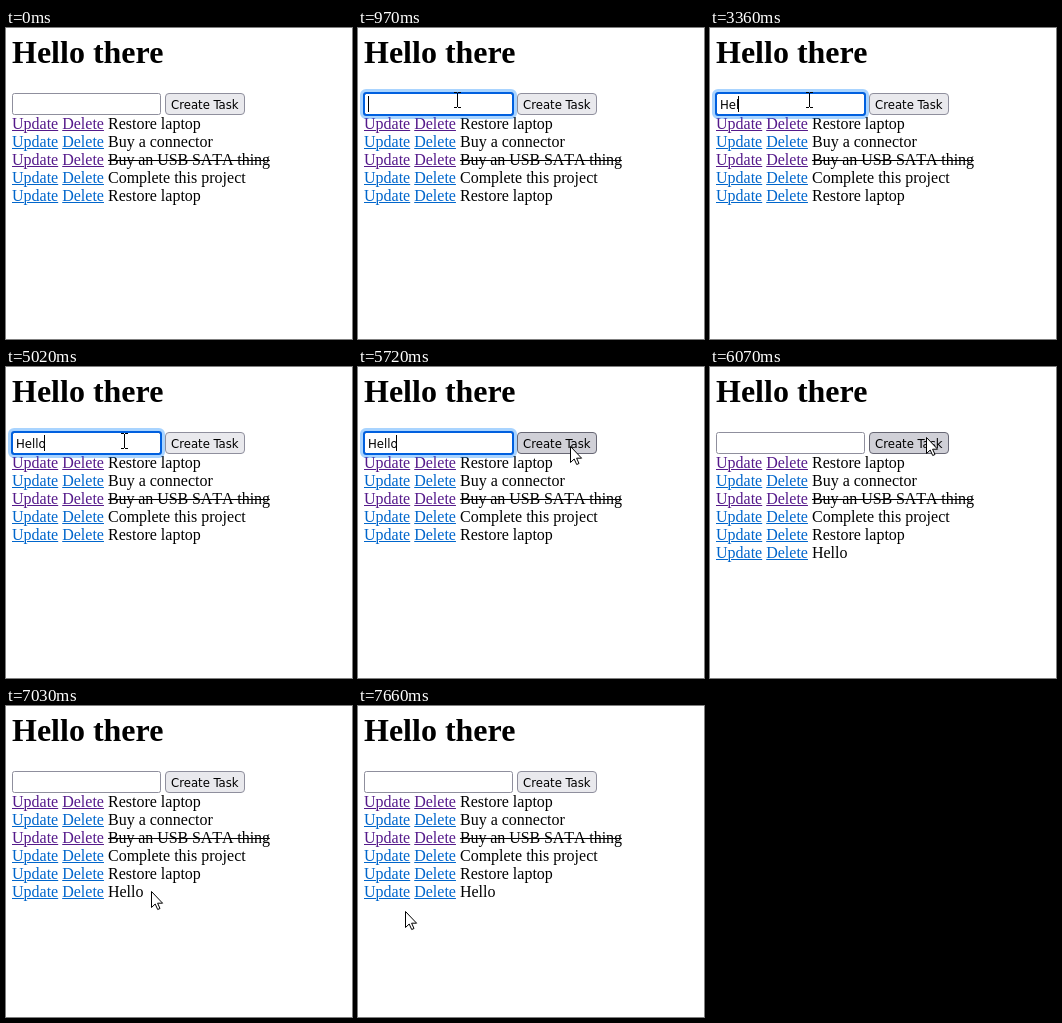
Recreate the animation shown at these times as an HTML page. Size 346 by 311 pixels, loop 8000 ms.

```html
<!DOCTYPE html>
<html lang="en">
<head>
<meta charset="utf-8">
<title>Task list</title>
<style>
  html, body { margin: 0; width: 100%; height: 100%; overflow: hidden; background: #fff; }
  body { position: relative; font: 16px/18px "Liberation Serif", serif; color: #000; }
  h1, #list { position: absolute; left: 6px; margin: 0; white-space: pre; }
  h1 { top: 6px; font-size: 32px; line-height: 36px; }
  #list { top: 87px; }
  #list div { height: 18px; }
  .link { color: #0066cc; text-decoration: underline 1px; text-underline-offset: 1px; }
  .visited { color: #551a8b; }
  .done { text-decoration: line-through 1px; font-kerning: none; letter-spacing: -.08px; }
  svg { position: absolute; left: 0; top: 0; width: 100%; height: 100%; }
  .control { font: 13px "DejaVu Sans Condensed", "DejaVu Sans", sans-serif; font-stretch: condensed; }
</style>
</head>
<body>
<h1>Hello there</h1>
<div id="list"></div>
<svg viewBox="0 0 346 311">
  <g class="control">
    <rect id="button" x="159.5" y="65.5" width="79" height="21" rx="3.5" stroke="#8f8f9d"/>
    <text x="165" y="81">Create Task</text>
    <rect id="field" x="6.5" y="65.5" width="148" height="21" rx="2" fill="#fff"/>
    <g id="focus" fill="none">
      <rect x="3.5" y="62.5" width="154" height="27" rx="4.5" stroke="#0a84ff" stroke-opacity=".35" stroke-width="3"/>
      <rect x="6" y="65" width="149" height="22" rx="2" stroke="#0060df" stroke-width="2"/>
    </g>
    <text id="typed" x="10" y="81"></text>
    <rect id="caret" y="68" width="1" height="16"/>
  </g>
  <path id="arrow" d="M.5 .5V16.5L4.2 13L6.7 18.5L9 17.5L6.6 12.2H11.6Z" fill="#fff" stroke="#000" stroke-linejoin="round"/>
  <path id="beam" d="M-3 -6.5H0M1 -6.5H4M.5 -6V8M-3 8.5H0M1 8.5H4" fill="none" stroke="#000"/>
</svg>
<script>
const LOOP = 8000, STEP = 70, BLINK = 530;
const FOCUS = 970, PRESS = 5790, RELEASE = 5870, RELOAD = 6070;
const WORD = "Hello";
const keyTimes = [2030, 3020, 3360, 3490, 3560];
const caretX = [10, 18, 25, 28, 31, 38];

const tasks = [
  { name: "Restore laptop", right: 195, visited: true },
  { name: "Buy a connector", right: 207 },
  { name: "Buy an USB SATA thing", right: 264, visited: true, done: true },
  { name: "Complete this project", right: 240 },
  { name: "Restore laptop", right: 195 },
  { name: WORD, right: 138 }
];

// Pointer moves as [time, x, y]
const moves = [
  [[130, 214, 194], [410, 172, 140], [620, 120, 84], [760, 103, 66], [900, 99, 71]],
  [[4950, 99, 71], [5020, 118, 73], [5160, 158, 78], [5370, 203, 80], [5580, 212, 80], [5720, 212, 79]],
  [[6070, 216, 70], [6210, 223, 36], [6350, 227, 18], [6490, 239, 22], [6630, 228, 62],
   [6770, 186, 134], [6910, 158, 166], [7120, 118, 222], [7330, 82, 223], [7610, 47, 205]]
];

const $ = id => document.getElementById(id);
const show = (el, on) => { el.style.visibility = on ? "visible" : "hidden"; };
const inBox = (p, x, y, r, b) => p.x >= x && p.x <= r && p.y >= y && p.y <= b;

function span(text, cls) {
  const el = document.createElement("span");
  el.className = cls;
  el.textContent = text;
  return el;
}

for (const task of tasks) {
  const link = task.visited ? "link visited" : "link";
  task.row = document.createElement("div");
  task.row.append(span("Update", link), " ", span("Delete", link), " ",
    span(task.name, task.done ? "done" : ""));
  $("list").append(task.row);
}

function pointerAt(t) {
  const path = moves.filter(m => t >= m[0][0]).pop();
  if (!path) return null;
  const start = path[0][0];
  const time = start + Math.floor((t - start) / STEP) * STEP;
  const next = path.findIndex(p => p[0] > time);
  if (next < 0) {
    const [, x, y] = path[path.length - 1];
    return { x, y };
  }
  const [t0, x0, y0] = path[next - 1], [t1, x1, y1] = path[next];
  const k = (time - t0) / (t1 - t0);
  return { x: Math.round(x0 + (x1 - x0) * k), y: Math.round(y0 + (y1 - y0) * k) };
}

function render(t) {
  const reloaded = t >= RELOAD;
  const focused = t >= FOCUS && t < PRESS;
  const count = reloaded ? 0 : keyTimes.filter(k => t >= k).length;
  const lastKey = count ? keyTimes[count - 1] : FOCUS;

  $("typed").textContent = WORD.slice(0, count);
  $("caret").setAttribute("x", caretX[count]);
  show($("caret"), focused && Math.floor((t - lastKey) / BLINK) % 2 === 0);
  show($("focus"), focused);
  show(tasks[5].row, reloaded);

  const p = pointerAt(t);
  const overField = p && inBox(p, 6, 65, 155, 87);
  const overButton = p && inBox(p, 159, 65, 239, 87);
  const overText = p && tasks.some((task, i) =>
    (i < 5 || reloaded) && inBox(p, 102, 88 + 18 * i, task.right, 105 + 18 * i));
  const beam = overField || overText;

  $("field").setAttribute("stroke", overField ? "#676774" : "#8f8f9d");
  const pressed = t >= PRESS && t < RELEASE;
  $("button").setAttribute("fill", pressed ? "#b1b1b9" : overButton ? "#d0d0d7" : "#e9e9ed");
  $("button").setAttribute("stroke", overButton ? "#676774" : "#8f8f9d");

  show($("arrow"), p && !beam);
  show($("beam"), p && beam);
  if (p) {
    for (const id of ["arrow", "beam"])
      $(id).setAttribute("transform", `translate(${p.x} ${p.y})`);
  }
}

const began = performance.now();
function tick() {
  render((performance.now() - began) % LOOP);
  requestAnimationFrame(tick);
}
tick();
</script>
</body>
</html>
```
